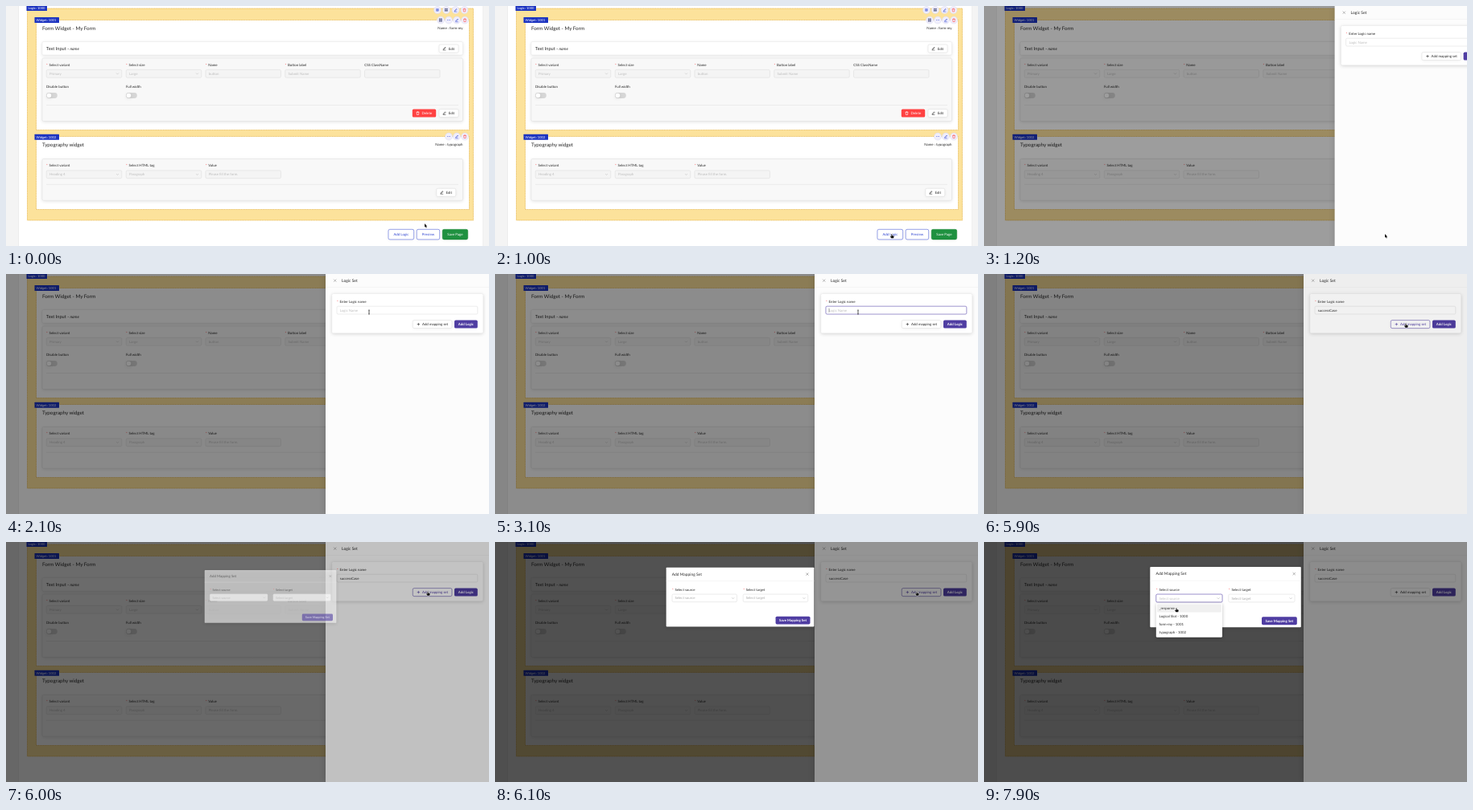
Recreate the animation shown at these times as an HTML page with a canvas. Size 600x299 px, loop 8 s.

```html
<!DOCTYPE html>
<html lang="en">
<head>
<meta charset="utf-8">
<title>Logic set builder</title>
<style>
html, body { margin: 0; width: 100%; height: 100%; overflow: hidden; background: #fff; }
canvas { display: block; width: 600px; height: 299px; }
</style>
</head>
<body>
<canvas id="stage"></canvas>
<script>
const W = 600, H = 299, LOOP = 8000;
const INK = '#262626', MUTED = '#bdbdbd', LINE = '#d9d9d9', PURPLE = '#4f3da2', BLUE = '#2f45d0', RED = '#ff4d4f';
const canvas = document.getElementById('stage');
const c = canvas.getContext('2d');
const dpr = window.devicePixelRatio || 1;
canvas.width = W * dpr;
canvas.height = H * dpr;

// Type sizes: 14, 16, 18 and 20 px in a 1920 px wide layout
const SM = 4.375, MD = 5, LG = 5.625, XL = 6.25;

const clamp = v => Math.max(0, Math.min(1, v));
const ramp = (t, start, dur) => clamp((t - start) / dur);

function bezier(x1, y1, x2, y2) {
  const at = (a, b, s) => 3 * (1 - s) ** 2 * s * a + 3 * (1 - s) * s * s * b + s ** 3;
  return p => {
    if (p <= 0 || p >= 1) return clamp(p);
    let lo = 0, hi = 1;
    for (let i = 0; i < 24; i++) {
      const mid = (lo + hi) / 2;
      if (at(x1, x2, mid) < p) lo = mid; else hi = mid;
    }
    return at(y1, y2, lo);
  };
}
const slideEase = bezier(.23, 1, .32, 1);
const zoomEase = bezier(.08, .82, .17, 1);

function text(s, x, y, size = SM, color = INK, style = '', align = 'left') {
  c.font = `${style} ${size}px Lato, sans-serif`;
  c.textAlign = align;
  c.fillStyle = color;
  c.fillText(s, x, y + size * .35);
}

function box(x, y, w, h, r, fill, stroke, shadow) {
  c.beginPath();
  c.roundRect(x, y, w, h, r);
  if (fill) {
    c.save();
    if (shadow) {
      c.shadowColor = `rgba(0,0,0,${shadow})`;
      c.shadowBlur = 4 * dpr;
      c.shadowOffsetY = dpr;
    }
    c.fillStyle = fill;
    c.fill();
    c.restore();
  }
  if (stroke) {
    c.strokeStyle = stroke;
    c.lineWidth = .5;
    c.stroke();
  }
}

function line(points, color, width = .5) {
  c.beginPath();
  points.forEach(([x, y], i) => i ? c.lineTo(x, y) : c.moveTo(x, y));
  c.strokeStyle = color;
  c.lineWidth = width;
  c.stroke();
}

function dashed(x, y, w, h) {
  c.setLineDash([1.3, .8]);
  c.strokeStyle = '#e3ad36';
  c.lineWidth = .7;
  c.strokeRect(x, y, w, h);
  c.setLineDash([]);
}

const cross = (x, y, r, color) => {
  line([[x - r, y - r], [x + r, y + r]], color);
  line([[x + r, y - r], [x - r, y + r]], color);
};
const plus = (x, y, r, color, w) => {
  line([[x - r, y], [x + r, y]], color, w);
  line([[x, y - r], [x, y + r]], color, w);
};
const chevron = (x, y, color = MUTED) => line([[x - 1.5, y - .8], [x, y + .8], [x + 1.5, y - .8]], color);

function pencil(x, y, color) {
  line([[x - 1.2, y + .8], [x + 1, y - 1.5], [x + 1.7, y - .8], [x - .5, y + 1.3], [x - 1.4, y + 1.5], [x - 1.2, y + .8]], color, .55);
  line([[x - 1.8, y + 2.2], [x + 1.9, y + 2.2]], color, .5);
}

function trash(x, y, color) {
  line([[x - 1.8, y - 1.1], [x + 1.8, y - 1.1]], color, .6);
  line([[x - .7, y - 1.2], [x - .7, y - 1.9], [x + .7, y - 1.9], [x + .7, y - 1.2]], color, .5);
  line([[x - 1.3, y - 1], [x - 1.1, y + 2], [x + 1.1, y + 2], [x + 1.3, y - 1]], color, .6);
}

function grid(x, y, color) {
  c.strokeStyle = color;
  c.lineWidth = .55;
  for (const dx of [-1.8, .3]) for (const dy of [-1.8, .3]) c.strokeRect(x + dx, y + dy, 1.4, 1.4);
}

function dots(x, y, color) {
  c.fillStyle = color;
  for (const dx of [-1.7, -.3, 1.1]) c.fillRect(x + dx, y - .3, .7, .7);
}

function tools(y, icons) {
  icons.forEach(([x, draw, color]) => {
    box(x - 4.5, y - 4.5, 9, 9, 4.5, '#f0eefc', '#d9d8ee');
    draw(x, y, color);
  });
}

function label(s, x, y, required = true) {
  if (required) text('*', x, y + .4, SM, RED);
  text(s, required ? x + 3.6 : x, y);
}

function field(name, value, x, y, { select = false, required = true } = {}) {
  label(name, x, y - 11.3, required);
  box(x + .25, y - 4.9, 93.5, 9.8, 1.5, '#f4f4f4', LINE);
  text(value, x + 4, y, SM, MUTED);
  if (select) chevron(x + 88.5, y);
}

function toggle(name, x) {
  text(name, x, 100);
  box(x, 108, 13.8, 6.9, 3.45, '#d6d6d6');
  box(x + .7, 108.7, 5.5, 5.5, 2.75, '#fff', null, .12);
}

function editButton(x, y) {
  box(x, y, 24, 10, 1.6, '#fff', LINE, .06);
  pencil(x + 6.5, y + 4.8, INK);
  text('Edit', x + 11.7, y + 5);
}

function tag(s, x, y, w) {
  box(x, y, w, 7, .5, '#1c33c0');
  text(s, x + 2, y + 3.6, 4.1, '#fff');
}

function pill(s, x, w, color, fill = '#fff') {
  box(x, 278.3, w, 12.6, 1.8, fill, color, .05);
  text(s, x + w / 2, 284.7, SM, fill === '#fff' ? color : '#fff', '', 'center');
}

function drawPage() {
  c.fillStyle = '#f4f4f4';
  c.fillRect(0, 0, W, H);
  c.fillStyle = '#fff';
  c.fillRect(15.5, 0, 577, H);
  line([[15.5, 0], [15.5, H]], '#dedede');
  line([[592.5, 0], [592.5, H]], '#e4e4e4');

  c.fillStyle = '#fce29b';
  c.fillRect(26.5, 3, 554, 264);
  dashed(26.5, 3, 554, 264);
  for (const [y, h] of [[17.5, 137], [162.5, 91]]) {
    c.fillStyle = '#fff';
    c.fillRect(37.5, y, 538, h);
    dashed(37.5, y, 538, h);
  }
  tag('Logic: 1000', 25.5, -1, 25.5);
  tag('Widget: 1001', 35.5, 14, 30.5);
  tag('Widget: 1002', 35.5, 159.8, 30.5);
  const edit = [560, pencil, BLUE], del = [570, trash, RED], more = [550, dots, BLUE];
  tools(5, [[536, (x, y, k) => { plus(x, y, 1.9, k, .8); grid(x, y, '#8f9be8'); }, BLUE], [547, grid, '#333c6e'], [558.5, pencil, BLUE], [569.5, trash, RED]]);
  tools(17.6, [[540, grid, '#333c6e'], more, edit, del]);
  tools(162.6, [more, edit, del]);

  text('Form Widget - My Form', 45, 27.5, XL);
  text('Name : form-my', 567.5, 27.5, SM, INK, '', 'right');
  box(45, 44.5, 522.5, 16.5, 1.6, '#fff', '#e4e4e4', .12);
  text('Text Input - ', 50, 53.2, LG);
  text('name', 79.4, 53.2, MD, INK, 'italic');
  editButton(538, 48);
  box(45, 65, 522.5, 78.5, 1.6, '#f8f8f8', '#dcdcdc', .12);
  field('Select variant', 'Primary', 50, 84.3, { select: true });
  field('Select size', 'Large', 149, 84.3, { select: true });
  field('Name', 'button', 247.7, 84.3);
  field('Button label', 'Submit Name', 346.5, 84.3);
  field('CSS ClassName', '', 445.3, 84.3, { required: false });
  toggle('Disable button', 50);
  toggle('Full width', 149);
  line([[50, 123.5], [562, 123.5]], '#dcdcdc');
  box(504.8, 128.5, 29.4, 10, 1.6, '#ff4242');
  trash(511.5, 133.5, '#fff');
  text('Delete', 516.5, 133.6, SM, '#fff');
  editButton(538, 128.5);

  text('Typography widget', 45, 172.6, XL);
  text('Name : typograph', 567.5, 172.6, SM, INK, '', 'right');
  box(45, 190.5, 522.5, 51.7, 1.6, '#f8f8f8', '#dcdcdc', .12);
  field('Select variant', 'Heading 4', 50, 209.8, { select: true });
  field('Select HTML tag', 'Paragraph', 149, 209.8, { select: true });
  field('Value', 'Please fill the form.', 247.7, 209.8);
  line([[50, 222.3], [562, 222.3]], '#dcdcdc');
  editButton(534.8, 227.3);

  pill('Add Logic', 475, 31.7, BLUE);
  pill('Preview', 510.2, 28.5, BLUE);
  pill('Save Page', 542.2, 31.5, '#16852f', '#1f9140');
}

const WORD = 'successCase';
const KEYS = [3200, 3300, 3500, 3560, 3600, 3900, 4000, 4500, 4800, 5000, 5100];

function drawDrawer(t) {
  const shift = 203 * (1 - slideEase(ramp(t, 1119, 300)));
  c.save();
  c.translate(shift, 0);
  c.save();
  c.shadowColor = 'rgba(0,0,0,.18)';
  c.shadowBlur = 8 * dpr;
  c.fillStyle = '#fcfcfc';
  c.fillRect(397, 0, 203, H);
  c.restore();
  cross(408.7, 8.2, 1.6, '#777');
  text('Logic Set', 417, 8.2, MD);
  line([[397, 16.5], [600, 16.5]], '#ececec');

  box(404.8, 24.5, 188, 49.3, 1.8, '#fff', '#e6e6e6', .16);
  label('Enter Logic name', 411, 34.2);
  const focus = t >= 2750 && t < 5890;
  if (focus) box(410.4, 39.7, 176, 10.8, 2, 'rgba(90,70,180,.14)');
  box(411, 40.2, 174.8, 9.8, 1.6, '#fff', focus ? PURPLE : LINE);
  const typed = WORD.slice(0, KEYS.filter(k => t >= k).length);
  text(typed || 'Logic Name', 414.8, 45.2, SM, typed ? INK : MUTED);
  if (focus) {
    const x = 415 + (typed ? c.measureText(typed).width : 0);
    line([[x, 42.6], [x, 47.8]], INK, .4);
  }

  const hover = ramp(t, 5600, 150) - ramp(t, 6250, 150);
  const tint = hover > .5 ? PURPLE : INK;
  box(505.3, 57.6, 48.6, 10, 1.7, '#fff', hover > .5 ? PURPLE : LINE, .05);
  plus(512.4, 62.6, 1.7, tint, .6);
  text('Add mapping set', 517, 62.7, SM, tint);
  box(557, 57.6, 28.8, 10, 1.7, PURPLE);
  text('Add Logic', 571.4, 62.7, SM, '#fff', 'bold', 'center');

  if (t >= 4000 && t < 4500) {
    c.fillStyle = '#1f1f22';
    c.beginPath();
    c.moveTo(445.8, 53.4);
    c.lineTo(448.5, 50.3);
    c.lineTo(451.2, 53.4);
    c.fill();
    box(441.8, 53.2, 37.6, 13.8, 1.2, '#1f1f22');
    text('Success Team', 445.8, 60.1, SM, '#fff', 'bold');
  }
  c.restore();
}

function drawModal(t) {
  const k = .2 + .8 * zoomEase(ramp(t, 5925, 300));
  c.save();
  c.globalAlpha = ramp(t, 5925, 130);
  c.translate(524, 63);
  c.scale(k, k);
  c.translate(-524, -63);
  box(206.3, 31, 187.5, 75.3, 1, '#fff', null, .2);
  text('Add Mapping Set', 213.6, 39.6, MD);
  cross(385.2, 39.6, 1.6, '#666');
  line([[206.3, 48.2], [393.8, 48.2]], '#ececec');
  const open = t >= 7350;
  [['source', 213.8], ['target', 303.8]].forEach(([s, x], i) => {
    const active = open && !i;
    label('Select ' + s, x, 59.2);
    if (active) box(x - .6, 64.6, 83.4, 10.9, 2, 'rgba(90,70,180,.18)');
    box(x, 65.1, 82.2, 9.8, 1.6, '#fff', active ? PURPLE : LINE);
    text('Select ' + s, x + 3.6, 70.1, SM, active ? '#c2c2c2' : '#a8a8a8');
    chevron(x + 77.3, 70.1, '#aaa');
  });
  box(345, 93.3, 43.8, 10, 1.7, PURPLE);
  text('Save Mapping Set', 366.9, 98.4, SM, '#fff', 'bold', 'center');
  if (open) drawMenu(ramp(t, 7350, 200));
  c.restore();
}

function drawMenu(p) {
  c.save();
  c.globalAlpha = p;
  c.translate(0, 76 * (1 - zoomEase(p)) * .2);
  c.scale(1, .8 + .2 * zoomEase(p));
  box(213.8, 76.2, 82.2, 42.6, 1.4, '#fff', null, .25);
  box(215, 77.6, 79.8, 10, 1, '#f0f0f0');
  ['_response', 'Logical Slot - 1000', 'form-my - 1001', 'typograph - 1002']
    .forEach((s, i) => text(s, 217.6, 82.7 + i * 9.9));
  c.restore();
}

// time, x, y
const PATH = [
  [0, 520, 271], [200, 520, 271], [850, 492, 284], [1050, 493, 284], [1200, 498, 284], [1700, 498, 284],
  [2100, 451, 47.5], [5150, 451, 47.5], [5700, 524, 61.5], [6300, 524, 61.5],
  [7050, 239, 69], [7650, 239, 69], [7880, 239, 82]
];
const SHAPES = [[0, 'arrow'], [600, 'hand'], [1150, 'arrow'], [2060, 'beam'], [3200, 'none'],
  [5150, 'beam'], [5280, 'arrow'], [5600, 'hand'], [6300, 'arrow'], [6980, 'hand']];

function pointerAt(t) {
  const i = PATH.findLastIndex(p => t >= p[0]);
  const [t0, x0, y0] = PATH[i], [t1, x1, y1] = PATH[i + 1] || [LOOP, x0, y0];
  const p = ramp(t, t0, t1 - t0), e = p * p * (3 - 2 * p);
  return [x0 + (x1 - x0) * e, y0 + (y1 - y0) * e];
}

function drawPointer(t) {
  const shape = SHAPES.findLast(s => t >= s[0])[1];
  if (shape === 'none') return;
  c.save();
  c.translate(...pointerAt(t));
  c.lineJoin = 'round';
  if (shape === 'beam') {
    line([[0, -2.4], [0, 2.4]], '#111', .7);
    line([[-1, -2.7], [0, -2.3], [1, -2.7]], '#111', .5);
    line([[-1, 2.7], [0, 2.3], [1, 2.7]], '#111', .5);
  } else {
    const outline = shape === 'arrow'
      ? 'M0 0V4.6L1.1 3.7L1.9 5.4L2.7 5L1.9 3.4H3.3Z'
      : 'M-.5 .4Q0 -.4 .5 .4V2L2.3 2.4Q2.8 2.6 2.7 3.4L2.2 5.2H-.6L-1.9 3.3Q-1.9 2.5 -1.2 2.8L-.5 3.3Z';
    const path = new Path2D(outline);
    c.strokeStyle = '#fff';
    c.lineWidth = .9;
    c.stroke(path);
    c.fillStyle = '#111';
    c.fill(path);
  }
  c.restore();
}

function mask(alpha) {
  c.fillStyle = `rgba(0,0,0,${alpha})`;
  c.fillRect(0, 0, W, H);
}

function render(t) {
  c.setTransform(dpr, 0, 0, dpr, 0, 0);
  c.textRendering = 'geometricPrecision';
  drawPage();
  if (t >= 1060) {
    mask(.45 * ramp(t, 1060, 165));
    if (t > 1119) drawDrawer(t);
  }
  if (t >= 5870) {
    mask(.45 * ramp(t, 5870, 250));
    if (t > 5925) drawModal(t);
  }
  drawPointer(t);
}

const begin = performance.now();
function tick() {
  render((performance.now() - begin) % LOOP);
  requestAnimationFrame(tick);
}
tick();
</script>
</body>
</html>
```
